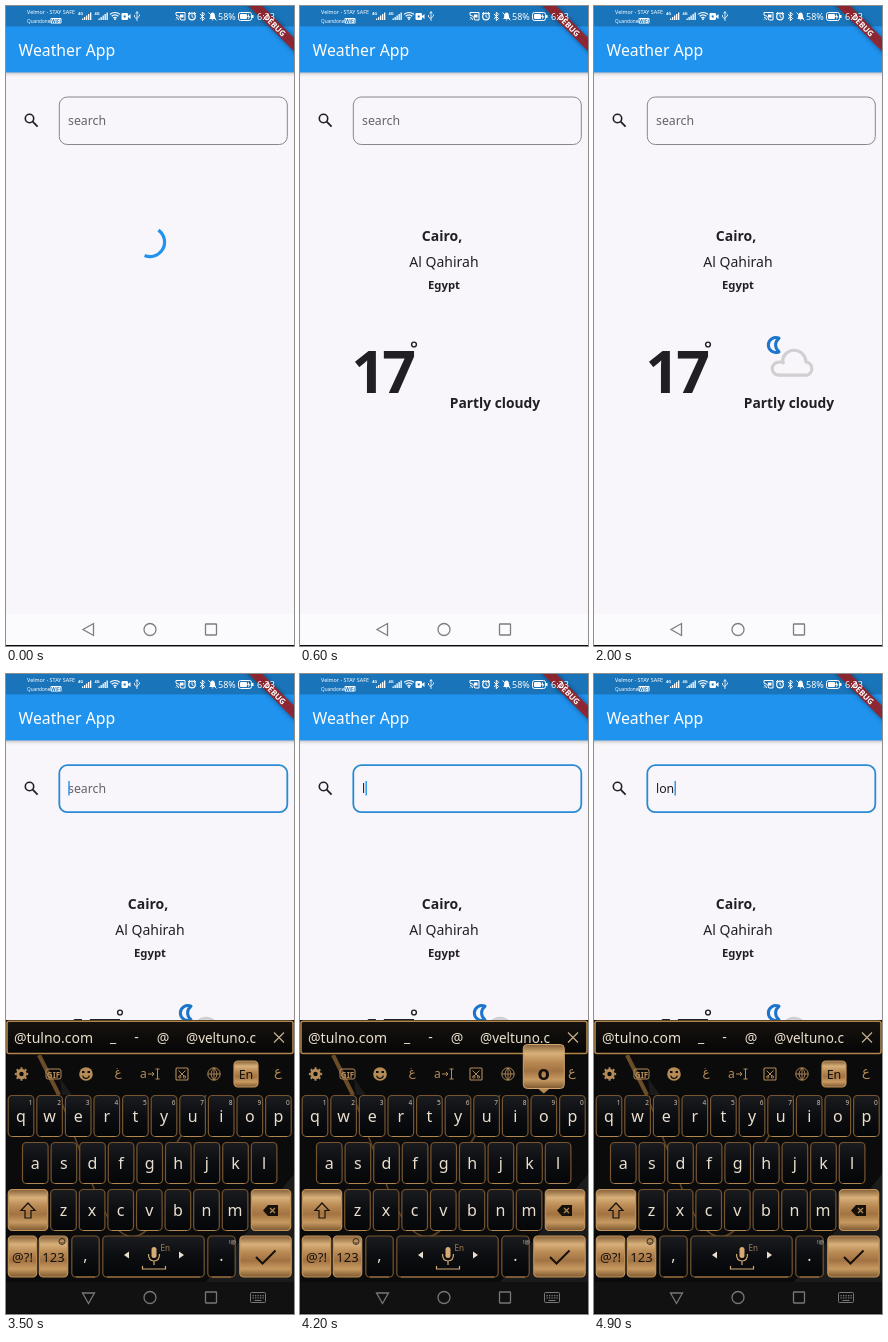
Recreate the animation shown at these times as an HTML page with a canvas. Size 288 px wide and 640 px high, loop 5000 ms.

```html
<!DOCTYPE html>
<html lang="en">
<head>
<meta charset="utf-8">
<title>Weather App</title>
<style>
html, body { margin: 0; width: 100%; height: 100%; overflow: hidden; background: #f8f6fa; }
canvas { display: block; width: 288px; height: 640px; }
</style>
</head>
<body>
<canvas id="stage"></canvas>
<script>
const W = 288, H = 640, LOOP = 5000, DEG = Math.PI / 180;
const BLUE = '#2093ef', STATUS = '#1a74ba', INK = '#211f24';
const GOLD = '#b58c58', CREAM = '#eadfce', DARK = '#0b0b0c', ENGRAVED = '#17110b';
const SANS = '"Noto Sans", "Open Sans", sans-serif', ARABIC = '"DejaVu Sans", sans-serif';
const canvas = document.getElementById('stage');
const dpr = window.devicePixelRatio || 1;
canvas.width = W * dpr;
canvas.height = H * dpr;
const c = canvas.getContext('2d');
c.scale(dpr, dpr);

function text(s, x, y, size, color = INK, weight = 400, align = 'left', family = SANS) {
  c.font = `${weight} ${size}px ${family}`;
  c.textAlign = align;
  c.fillStyle = color;
  c.fillText(s, x, y);
}
function rect(x, y, w, h, color) {
  c.fillStyle = color;
  c.fillRect(x, y, w, h);
}
function box(x, y, w, h, r, fill, stroke, width = 1) {
  c.beginPath();
  c.roundRect(x, y, w, h, r);
  if (fill) { c.fillStyle = fill; c.fill(); }
  if (stroke) { c.strokeStyle = stroke; c.lineWidth = width; c.stroke(); }
}
function stroke(color, width, d) {
  c.strokeStyle = color;
  c.lineWidth = width;
  c.stroke(new Path2D(d));
}
function fill(color, d) {
  c.fillStyle = color;
  c.fill(new Path2D(d));
}
function ring(x, y, r, color, width, from = 0, to = 360) {
  c.beginPath();
  c.arc(x, y, r, from * DEG, to * DEG);
  c.strokeStyle = color;
  c.lineWidth = width;
  c.stroke();
}
function vertical(y, h, ...colors) {
  const g = c.createLinearGradient(0, y, 0, y + h);
  colors.forEach((color, i) => g.addColorStop(i / (colors.length - 1), color));
  return g;
}
// Cubic (0.4, 0, 0.2, 1) easing
function fastOutSlowIn(x) {
  if (x >= 1) return 1;
  let lo = 0, hi = 1;
  for (let i = 0; i < 20; i++) {
    const u = (lo + hi) / 2, v = 1 - u;
    if (1.2 * v * v * u + 0.6 * v * u * u + u ** 3 < x) lo = u; else hi = u;
  }
  return lo * lo * (3 - 2 * lo);
}

function signal(x) {
  text('4G', x - 4, 8.5, 4, '#fff', 700);
  for (let i = 0; i < 5; i++) rect(x + i * 2, 12.5 - i * 1.5, 1.3, 1.5 + i * 1.5, '#fff');
}
function statusBar() {
  const w = '#fff';
  rect(0, 0, W, 20.4, STATUS);
  text('Velmor - STAY SAFE', 21, 8, 5.4, w, 500);
  text('Quandone', 21, 17, 4.7, w, 500);
  box(44.5, 12, 11, 5.5, 1, w);
  text('WiFi', 50, 16.5, 4.5, STATUS, 700, 'center');
  signal(76);
  signal(92.5);
  for (const r of [2.5, 5, 7.5]) ring(109, 14, r, w, 1.2, 228, 312);
  rect(108.2, 12.4, 1.6, 1.6, w);
  box(115.5, 7, 6.5, 7, 1.2, w);
  fill(w, 'M122 10l2.5-2v5l-2.5-2z');
  rect(117.7, 9.5, 2, 2, STATUS);
  stroke(w, 0.8, 'M131 15V6M129.7 7.5L131 5.5l1.3 2M131 13l-2.5-2V9M131 12l2.5-2V8.5');
  stroke(w, 1, 'M170 9V6.5h9v7.5h-4M170 14v-.5M170 11.5q2.5 0 2.5 2.5M170 9.5q4.5 0 4.5 4.5');
  rect(174, 8.5, 3.5, 3, w);
  ring(186, 10.5, 3.3, w, 1.2);
  stroke(w, 1, 'M186 8.5v2.2l1.5 1M182 8l2-2M190 8l-2-2');
  stroke(w, 1, 'M194 8l4.6 4.5-2.3 2.3V6l2.3 2.3L194 12.8');
  fill(w, 'M203 13q1.3-1 1.3-3.5 .3-3 2.3-3 2 0 2.3 3 0 2.5 1.3 3.5zM205.5 13.5h2q-1 1.8-2 0z');
  stroke(w, 0.9, 'M202.5 6.5l8 8');
  text('58%', 212, 13.8, 9, w);
  box(232.5, 6.5, 13, 8, 2, null, w, 1);
  rect(246, 9, 1.5, 3, w);
  box(234, 8, 7, 5, 1, w);
  fill(w, 'M243 7.5l-2 3.5h1.5l-.5 2.8 2.5-3.5h-1.6z');
}
function debugBanner() {
  c.save();
  c.translate(W, 0);
  c.rotate(45 * DEG);
  c.shadowColor = 'rgba(0,0,0,.5)';
  c.shadowBlur = 5 * dpr;
  rect(-42, 22.4, 84, 9.6, 'rgba(158,32,38,.88)');
  c.shadowColor = 'transparent';
  text('DEBUG', 0, 30.2, 8, '#fff', 800, 'center');
  c.restore();
}

function moonAndCloud() {
  c.lineJoin = 'round';
  stroke('#1b75cd', 3, 'M185 332.2A7.5 7.5 0 1 0 185 345.8A8.5 8.5 0 0 1 185 332.2Z');
  const cloud = 'M185 369.2A6.3 6.3 0 0 1 184.5 356.2Q188 355.5 190.5 357.5' +
    'M188.5 356A11 11 0 0 1 211.8 355.8A6.8 6.8 0 0 1 212.5 369.2H184.5';
  stroke('#d0cfd1', 3.2, cloud);
  c.lineJoin = 'miter';
}
function weather(t) {
  text('Cairo,', 142, 235, 14, INK, 700, 'center');
  text('Al Qahirah', 144, 261, 14, INK, 400, 'center');
  text('Egypt', 144, 283, 11.3, INK, 700, 'center');
  c.letterSpacing = '-3px';
  text('17', 51.5, 387, 59, INK, 700);
  c.letterSpacing = '0px';
  ring(114, 338.5, 2.4, INK, 1.4);
  if (t >= 700) moonAndCloud();
  text('Partly cloudy', 195, 402, 13.8, INK, 700, 'center');
}
function spinner(t) {
  const start = -55 + 0.2295 * t;
  ring(144, 236, 14.6, BLUE, 3.2, start, start + 270 * fastOutSlowIn(0.4 + t / 666.5));
}
function typed(t) {
  return t >= 4800 ? 'lon' : t >= 4400 ? 'lo' : t >= 4100 ? 'l' : '';
}
function searchField(t, focused) {
  ring(23.5, 112.5, 4.2, INK, 1.6);
  stroke(INK, 1.8, 'M26.7 115.7L31.6 120.6');
  if (focused) box(53.3, 91.2, 228, 47, 8, null, '#2b8bd2', 1.8);
  else box(53.3, 91, 228, 47.5, 8, null, '#89868c', 1);
  const value = typed(t);
  text(value || 'search', 62, 119, 12.3, value ? INK : '#65626a');
  if (focused) rect(62.3 + (value ? c.measureText(value).width : 0), 107, 1.4, 14.5, BLUE);
}
function navBar(dark) {
  const color = dark ? '#77777a' : '#7d7d80';
  rect(0, 608, W, 32, dark ? '#111112' : '#fbfafc');
  stroke(color, 1.3, dark ? 'M76.5 619H88.5L82.5 629.5Z' : 'M87.5 617.5V629.5L77 623.5Z');
  ring(144, 623.5, 6, color, 1.3);
  box(199.5, 618, 11, 11, 0.5, null, color, 1.3);
  if (dark) {
    box(244.5, 618.5, 15, 10, 1, null, color, 1);
    for (let i = 0; i < 10; i++) rect(246.5 + i % 5 * 2.5, 621 + (i > 4) * 2.3, 1.3, 1.3, color);
    rect(248.5, 626, 7, 1, color);
  }
  rect(0, 639, W, 1, '#0a0a0a');
}

function gold(y, h) {
  return vertical(y, h, '#86613a', '#d8b07a', '#b98a54', '#a27342', '#c89a62', '#7d5930');
}
function key(x, y, w, h = 41, golden = false) {
  box(x, y, w, h, 4, golden ? gold(y, h) : vertical(y, h, '#1b1c1f', '#0c0d10', '#050608'),
    golden ? '#c2935a' : '#76552f', 1.2);
  if (!golden) stroke('#b98c54', 0.9, `M${x + 4} ${y + h}H${x + w - 4}`);
}
const rows = [
  { keys: 'qwertyuiop', x: 15, y: 421.5 },
  { keys: 'asdfghjkl', x: 29.3, y: 468.5 },
  { keys: 'zxcvbnm', x: 57.5, y: 515.5 },
];
const PITCH = 28.6;

function popup(letter) {
  const row = rows.find(r => r.keys.includes(letter));
  const x = row.x + row.keys.indexOf(letter) * PITCH, y = row.y - 51;
  fill('#b98b52', `M${x - 7} ${y + 43}h14l-7 6z`);
  box(x - 20.5, y, 41, 44, 4, gold(y, 44), '#d0a46c', 1);
  text(letter, x, y + 35, 20, '#15100b', 700, 'center');
}
function suggestions() {
  rect(0, 346, W, 35, '#090807');
  box(1, 347.2, 286, 32.3, 2, vertical(347, 32, '#17130f', '#060606'), '#b1844c', 1.6);
  text('@tulno.com', 8, 369, 14, CREAM);
  text('_', 107, 368, 14, CREAM, 400, 'center');
  text('-', 130.5, 368, 14, CREAM, 400, 'center');
  text('@', 157, 369, 14, CREAM, 400, 'center');
  text('@veltuno.c', 180, 369, 13.5, CREAM);
  stroke('#c8b595', 1.1, 'M268 358.5l10 10M278 358.5l-10 10');
}
function toolbar() {
  ring(15.5, 400, 3.7, GOLD, 3);
  for (let a = 0; a < 360; a += 45) ring(15.5, 400, 5.7, GOLD, 2, a - 10, a + 10);
  box(40, 395, 15, 10, 2, null, GOLD, 1);
  text('GIF', 47.5, 403.5, 8, GOLD, 700, 'center');
  c.beginPath();
  c.arc(80, 400, 6.8, 0, 7);
  c.fillStyle = GOLD;
  c.fill();
  rect(76, 397, 2.5, 2, DARK);
  rect(81.5, 397, 2.5, 2, DARK);
  ring(80, 401, 3.4, DARK, 1.2, 10, 170);
  text('غ', 112, 402, 12, GOLD, 400, 'center', ARABIC);
  text('a', 134, 404, 12, GOLD);
  stroke(GOLD, 1, 'M142 400h6M146 398l2 2-2 2M149.5 395h4M151.5 395v10M149.5 405h4');
  box(170, 394, 12, 12, 1, null, GOLD, 1.1);
  stroke(GOLD, 1, 'M172.5 396.5l6 6M179.5 396.5l-6 6');
  ring(173.8, 403, 1.2, GOLD, 0.9);
  ring(178.5, 403, 1.2, GOLD, 0.9);
  ring(208, 400, 6.2, GOLD, 1);
  stroke(GOLD, 0.9, 'M202 400h12M208 394v12M208 394q-6 6 0 12M208 394q6 6 0 12');
  key(228, 387, 24, 26, true);
  text('En', 240, 405, 12.5, ENGRAVED, 500, 'center');
  text('ع', 272, 402, 13, GOLD, 400, 'center', ARABIC);
}
function letterKeys() {
  rows.forEach((row, r) => [...row.keys].forEach((letter, i) => {
    const x = row.x + i * PITCH;
    key(x - 12.8, row.y, 25.6);
    text(letter, x, row.y + 26.5, 16, CREAM, 400, 'center');
    if (r === 0) text((i + 1) % 10, x + 9.5, row.y + 9, 6.5, '#cfc3b0', 400, 'center');
  }));
}
function controlKeys() {
  key(2.3, 515.5, 39.4, 41, true);
  stroke(ENGRAVED, 1.2, 'M22 529l-7 7.5h4v7.5h6v-7.5h4z');
  key(245.3, 515.5, 39.4, 41, true);
  fill(ENGRAVED, 'M257 536.5l5-5.5h10v11h-10z');
  stroke(GOLD, 1.2, 'M264 534l5 5M269 534l-5 5');
  key(2.3, 562, 28.4, 41, true);
  text('@?!', 16.5, 588, 13, ENGRAVED, 400, 'center');
  key(33.3, 562, 28.4, 41, true);
  text('123', 47.5, 588, 13, ENGRAVED, 400, 'center');
  ring(56, 567.5, 3, ENGRAVED, 0.8);
  ring(56, 567.8, 1.4, ENGRAVED, 0.7, 10, 170);
  key(65.8, 562, 27.4);
  text(',', 79.5, 587, 16, CREAM, 400, 'center');
  key(96.8, 562, 101.4);
  fill(CREAM, 'M123 577.5v7l-5-3.5zM173 577.5v7l5-3.5z');
  box(145.5, 573, 5, 11, 2.5, '#d6ac74');
  stroke('#d6ac74', 1.2, 'M142.5 580q0 7 5.5 7t5.5-7M148 587v4M136.5 592v3h23v-3');
  text('En', 154.5, 577, 8, '#a38358');
  key(201.8, 562, 27.4);
  text('.', 215.5, 587, 16, CREAM, 400, 'center');
  text('!@', 226.5, 570, 6, '#cfc3b0', 400, 'center');
  key(233.8, 562, 51.4, 41, true);
  stroke(ENGRAVED, 2, 'M250 583l6.5 6.5 13-13');
}
function keyboard(t) {
  rect(0, 346, W, 262, DARK);
  fill('#1c1b1b', 'M54 404L66 421H56ZM200 608L288 500V608Z');
  stroke('#6b4c28', 4, 'M33 381L53 421');
  stroke('#5c4323', 1.6, 'M53 421L90 520Q120 590 150 545M200 421L170 470');
  suggestions();
  toolbar();
  letterKeys();
  controlKeys();
  const taps = [['l', 3900, 4100], ['o', 4200, 4400], ['n', 4600, 4800]];
  const tap = taps.find(([, down, up]) => t >= down && t < up);
  if (tap) popup(tap[0]);
}

function draw(t) {
  const focused = t >= 3500;
  rect(0, 0, W, H, '#f8f6fa');
  rect(0, 66, W, 5, vertical(66, 5, 'rgba(0,0,0,.24)', 'rgba(0,0,0,.07)', 'rgba(0,0,0,0)'));
  rect(0, 0, W, 66.4, BLUE);
  text('Weather App', 12.5, 50, 15.8, '#fff', 500);
  searchField(t, focused);
  if (t < 600) spinner(t); else weather(t);
  if (focused) keyboard(t);
  navBar(focused);
  statusBar();
  debugBanner();
  text('6:23', 251, 13.8, 9, '#fff');
}
function loop() {
  draw(performance.now() % LOOP);
  requestAnimationFrame(loop);
}
loop();
</script>
</body>
</html>
```
